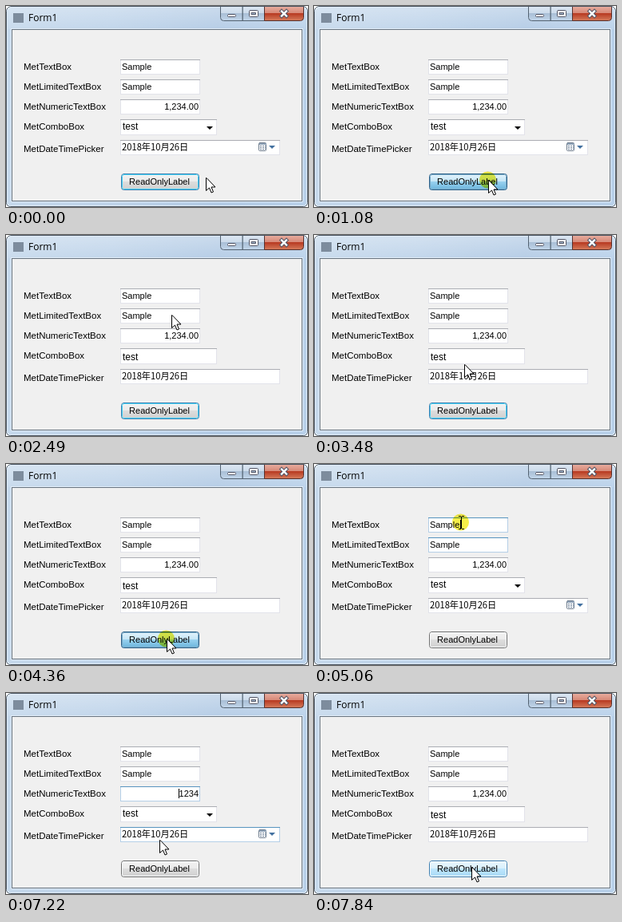
An HTML page with a canvas that plays this animation: 378x252 px, repeating every 8 s.

```html
<!DOCTYPE html>
<html lang="ja">
<head>
<meta charset="utf-8">
<style>
  html, body { margin: 0; width: 100%; height: 100%; overflow: hidden; }
  canvas { display: block; }
</style>
</head>
<body>
<canvas id="stage" width="378" height="252"></canvas>
<script>
const ctx = document.getElementById('stage').getContext('2d');
const LOOP = 8000;
const SANS = '"Liberation Sans", Arial, sans-serif';

// Bursts of screen updates: start, end, number of updates
const bursts = [
  [530, 850, 5], [1080, 1160, 2], [1390, 1930, 8], [2100, 2870, 11], [2940, 3710, 11],
  [3790, 4430, 9], [4580, 5360, 11], [5440, 6220, 10], [6300, 7060, 11], [7140, 7840, 10]
];
// Pointer: time, x, y
const path = [
  [0, 250, 215], [450, 250, 215], [850, 218, 218], [1310, 218, 218], [1930, 201, 66],
  [2100, 203, 69], [2485, 207, 100], [2870, 186, 130], [3300, 181, 150], [3710, 198, 177],
  [4270, 201, 219], [4500, 201, 219], [5048, 184, 73], [5200, 184, 73], [5670, 190, 101],
  [5750, 190, 101], [5980, 190, 128], [6220, 189, 130], [6376, 189, 143], [6452, 189, 143],
  [7060, 191, 177], [7140, 191, 178], [7680, 197, 218], [8000, 197, 218]
];
const clicks = [[1080, 1160], [4340, 4430], [5040, 5130], [5670, 5750], [5980, 6060], [7750, 7840]];

const boxes = {
  text: [143, 67, 100, 19], limited: [143, 92, 100, 19], numeric: [143, 117, 100, 19],
  combo: [143, 142, 121, 20], date: [143, 168, 200, 19], button: [144, 210, 98, 21]
};
const labels = [
  ['MetTextBox', 80], ['MetLimitedTextBox', 105], ['MetNumericTextBox', 130],
  ['MetComboBox', 155], ['MetDateTimePicker', 183]
];

function updateTime(t) {
  let shown = 0;
  for (const [start, end, count] of bursts) {
    if (t < start) break;
    const step = (end - start) / (count - 1);
    shown = start + step * Math.min(count - 1, Math.floor((t - start) / step + 0.1));
  }
  return Math.round(shown);
}

function pointerAt(t) {
  const i = Math.max(1, path.findIndex(p => p[0] >= t));
  const [t0, x0, y0] = path[i - 1], [t1, x1, y1] = path[i];
  const k = Math.max(0, (t - t0) / (t1 - t0));
  return [Math.round(x0 + (x1 - x0) * k), Math.round(y0 + (y1 - y0) * k)];
}

const inside = ([px, py], [x, y, w, h]) => px >= x && px < x + w && py >= y && py < y + h;

function focusAt(t) {
  if (t < 5040 || t >= 7750) return 'button';
  return t < 5670 ? 'text' : t < 5980 ? 'limited' : 'numeric';
}

function rect(x, y, w, h, fill) {
  ctx.fillStyle = fill;
  ctx.fillRect(x, y, w, h);
}

function round(x, y, w, h, r, fill, stroke) {
  ctx.beginPath();
  ctx.roundRect(x, y, w, h, r);
  if (fill) { ctx.fillStyle = fill; ctx.fill(); }
  if (stroke) { ctx.strokeStyle = stroke; ctx.lineWidth = 1; ctx.stroke(); }
}

function shape(points, fill, stroke) {
  ctx.beginPath();
  points.forEach(([x, y]) => ctx.lineTo(x, y));
  ctx.closePath();
  ctx.fillStyle = fill;
  ctx.fill();
  if (stroke) { ctx.strokeStyle = stroke; ctx.lineWidth = 1; ctx.stroke(); }
}

function gradient(x0, y0, x1, y1, ...stops) {
  const g = ctx.createLinearGradient(x0, y0, x1, y1);
  stops.forEach(([at, color]) => g.addColorStop(at, color));
  return g;
}

// Two-tone glass: a light upper half and a darker lower half
const glass = (y, h, a, b, c, d) => gradient(0, y, 0, y + h, [0, a], [0.48, b], [0.5, c], [1, d]);

function text(str, x, y, size = 11, align = 'left', family = SANS) {
  ctx.font = `${size}px ${family}`;
  ctx.textAlign = align;
  ctx.fillStyle = '#000';
  ctx.fillText(str, x, y);
}

function drawWindow() {
  rect(0, 0, 378, 252, '#fff');
  round(0.5, 0.5, 377, 251, [6, 6, 5, 5],
    gradient(0, 0, 378, 0, [0, '#c6d9ec'], [0.35, '#bfd4ea'], [0.7, '#b3cbe5'], [1, '#b9d1ea']), '#4b5663');
  round(1.5, 1.5, 375, 249, [5, 5, 4, 4], null, '#e3eef8');
  rect(2, 2, 374, 27, gradient(0, 2, 0, 29, [0, 'rgba(255,255,255,.3)'], [1, 'rgba(255,255,255,.05)']));
  rect(6, 28, 366, 218, '#e1ecf7');
  rect(7, 29, 364, 216, '#687480');
  rect(8, 30, 362, 214, '#f0f0f0');

  rect(9, 9, 13, 12, '#7d8c9d');
  text('Form1', 28, 19, 12, 'left', '"Open Sans", sans-serif');

  const light = glass(0, 19, '#dfe9f4', '#cbdaea', '#a9bfd6', '#c3d7eb');
  round(268.5, -3.5, 28, 22, [0, 0, 0, 4], light, '#536271');
  round(296.5, -3.5, 27, 22, 0, light, '#536271');
  round(323.5, -3.5, 49, 22, [0, 0, 4, 0], glass(0, 19, '#e9b0a3', '#d68775', '#b83a22', '#d7805f'), '#56302d');
  rect(268, 0, 105, 1, '#4b5663');
  round(277.5, 10.5, 10, 3, 1, '#fff', '#535666');
  round(304.5, 5.5, 11, 8, 1, '#fff', '#535666');
  round(307.5, 8.5, 5, 2, 0, '#a9bfd6', '#535666');
  ctx.lineCap = 'square';
  for (const [color, width] of [['#535666', 4.5], ['#fff', 2.4]]) {
    ctx.beginPath();
    ctx.moveTo(345, 6.5); ctx.lineTo(351, 12.5);
    ctx.moveTo(351, 6.5); ctx.lineTo(345, 12.5);
    ctx.strokeStyle = color;
    ctx.lineWidth = width;
    ctx.stroke();
  }
}

function drawField([x, y, w, h], active) {
  rect(x, y, w, h, active ? '#b5cfe7' : '#e2e3ea');
  rect(x, y, w, 1, active ? '#5794bf' : '#abadb3');
  rect(x + 1, y + 1, w - 2, h - 2, '#fff');
}

function drawDropDowns() {
  shape([[251, 151], [259, 151], [255, 155]], '#000');
  round(316.5, 171.5, 9, 10, 1, '#fff', '#6d7b8c');
  rect(317, 172, 9, 2, '#8fa3b8');
  for (let i = 0; i < 9; i++) rect(318 + i % 3 * 3, 175 + Math.floor(i / 3) * 2, 2, 1, '#6d8299');
  shape([[329, 175], [337, 175], [333, 179]], '#42709f');
}

function drawButton(pressed, hot, focused) {
  const [x, y, w, h] = boxes.button;
  const tones = pressed ? ['#e5f4fc', '#c4e5f6', '#98d1ef', '#68b3db']
    : hot ? ['#eaf6fd', '#d9f0fc', '#bee6fd', '#a7d9f5']
    : ['#f2f2f2', '#ebebeb', '#dddddd', '#cfcfcf'];
  const edge = pressed ? '#2c628b' : hot || focused ? '#3c7fb1' : '#707070';
  round(x + 0.5, y + 0.5, w - 1, h - 1, 3, glass(y, h, ...tones), edge);
  const inner = pressed ? '#7aa9c5' : focused && !hot ? '#46d2f5' : '#fafcfd';
  round(x + 1.5, y + 1.5, w - 3, h - 3, 2, null, inner);
  text('ReadOnlyLabel', x + w / 2 - 1, 224, 11, 'center');
}

function drawPointer(x, y, beam) {
  if (beam) {
    rect(x, y - 7, 1, 15, '#000');
    for (const dy of [-8, 8]) {
      rect(x - 3, y + dy, 3, 1, '#000');
      rect(x + 1, y + dy, 3, 1, '#000');
    }
    return;
  }
  const arrow = [[0, 0], [0, 16], [4, 12.5], [6.5, 18.5], [9, 17.5], [6.5, 11.5], [11, 11.5]];
  shape(arrow.map(([dx, dy]) => [x + dx + 0.5, y + dy + 0.5]), '#fff', '#000');
}

function draw(now) {
  const t = updateTime(now % LOOP);
  const pointer = pointerAt(t), trail = pointerAt(t - 100);
  const clicking = clicks.some(([a, b]) => t >= a && t < b);
  const readOnly = t >= 1160 && t < 4430 || t >= 7840;
  const focus = focusAt(t);

  drawWindow();
  for (const [label, y] of labels) text(label, 22, y, 11.5);
  for (const name of ['text', 'limited', 'numeric', 'combo', 'date']) {
    const box = boxes[name];
    drawField(box, !readOnly && (focus === name || inside(pointer, box) || inside(trail, box)));
  }
  text('Sample', 145, 80);
  text('Sample', 145, 105);
  text(focus === 'numeric' ? '1234' : '1,234.00', 241, 130, 11, 'right');
  text('test', 146, readOnly ? 157 : 155, 12);
  text('2018年10月26日', 145, 181, 11.2, 'left', '"Noto Sans CJK JP", "Noto Sans CJK", sans-serif');
  if (!readOnly) drawDropDowns();
  if (focus !== 'button') rect(focus === 'numeric' ? 216 : 183, boxes[focus][1] + 3, 1, 12, '#000');

  const overButton = inside(pointer, boxes.button);
  drawButton(overButton && clicking, overButton, focus === 'button');

  if (clicking) {
    ctx.globalCompositeOperation = 'multiply';
    ctx.beginPath();
    ctx.arc(pointer[0] - 0.5, pointer[1], 10.5, 0, 7);
    ctx.fillStyle = '#f6ee48';
    ctx.fill();
    ctx.globalCompositeOperation = 'source-over';
  }
  const beam = !readOnly && ['text', 'limited', 'numeric'].some(name => inside(pointer, boxes[name]));
  drawPointer(...pointer, beam);
}

function tick() {
  draw(performance.now());
  requestAnimationFrame(tick);
}
tick();
</script>
</body>
</html>
```
